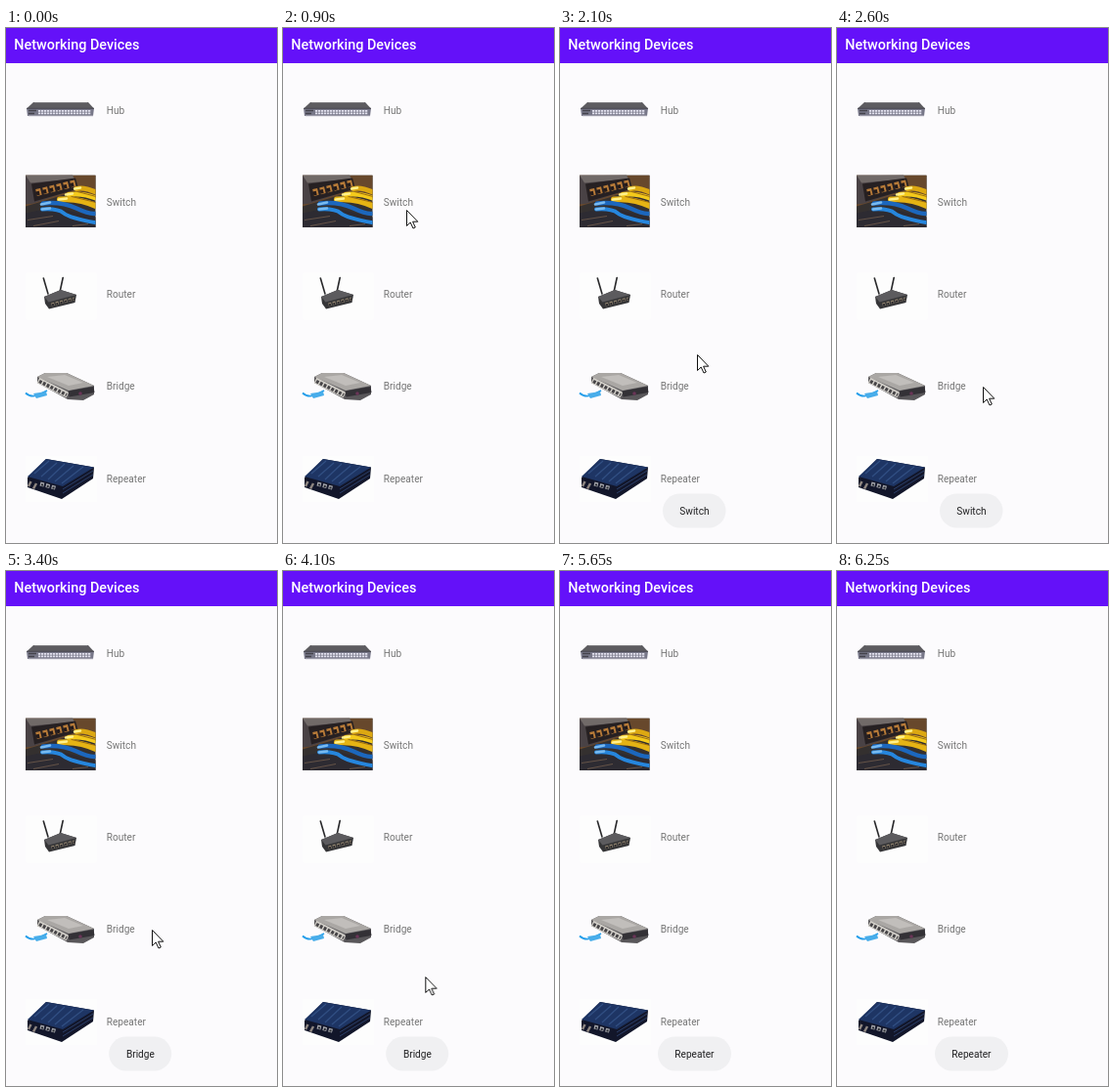
These frames come from a looping animation (277x527 px, 6300 ms). An HTML page:

```html
<!DOCTYPE html>
<html lang="en">
<head>
<meta charset="utf-8">
<title>Networking Devices</title>
<style>
html, body { margin: 0; width: 100%; height: 100%; overflow: hidden; background: #fcfbfd; }
svg { display: block; width: 277px; height: 527px; }
text { font: 10.08px Roboto, sans-serif; fill: #757575; }
.title { font-size: 14.4px; font-weight: 500; fill: #fff; }
.toast { opacity: 0; animation: 6.3s linear infinite; }
.toast rect { fill: #f0f0f2; }
.toast text { fill: #202022; text-anchor: middle; }
#switch { animation-name: switch; }
#bridge { animation-name: bridge; }
#repeater { animation-name: repeater; }
#cursor { animation: move 6.3s ease-in-out infinite; }

@keyframes switch {
  0%, 16.67% { opacity: 0; }
  20.63%, 53.96% { opacity: 1; }
  53.97%, 100% { opacity: 0; }
}
@keyframes bridge {
  0%, 53.96% { opacity: 0; }
  53.97%, 81.75% { opacity: 1; }
  84.13%, 100% { opacity: 0; }
}
@keyframes repeater {
  0%, 85.71% { opacity: 0; }
  88.89%, 100% { opacity: 1; }
}
@keyframes move {
  0%, 5.5% { transform: translate(290px, 235px); }
  11.9%, 24.6% { transform: translate(126px, 186px); }
  33.33%, 34.9% { transform: translate(140px, 334px); }
  41.3%, 53.97% { transform: translate(149px, 367px); }
  75.4%, 81.75% { transform: translate(142px, 457px); }
  88.1%, 100% { transform: translate(290px, 480px); }
}
</style>
</head>
<body>
<svg viewBox="0 0 277 527">
  <rect width="277" height="527" fill="#fcfbfd"/>
  <rect width="277" height="36" fill="#6411f9"/>
  <text class="title" x="8.3" y="22">Networking Devices</text>

  <!-- Hub -->
  <path d="M28 76H84L90 82.5H21Z" fill="#5d5c60"/>
  <path d="M29 76.6H83" stroke="#77767a"/>
  <path d="M21 82H90L89 90H22Z" fill="#777788"/>
  <path d="M21 82.3H90" stroke="#424148" stroke-width=".9"/>
  <path d="M33 84.8H87M33 87.4H87" stroke="#e2e1ee" stroke-width="1.8" stroke-dasharray="2.3 .7"/>
  <path d="M23 84.5H31M23 87.5H29" stroke="#44434c" stroke-width="1.5"/>
  <path d="M23 90H89" stroke="#c9c8d2" stroke-width=".8"/>
  <text x="102.8" y="87.5">Hub</text>

  <!-- Switch -->
  <svg x="20" y="150.5" width="71.5" height="53.5" viewBox="0 0 71.5 53.5">
    <rect width="72" height="54" fill="#34302f"/>
    <path d="M0 0H72V24L50 17L0 32Z" fill="#67482c"/>
    <path d="M0 1L48 0L54 13L8 29L0 30Z" fill="#494245"/>
    <path d="M0 0H48L50 4L5 8Z" fill="#716a68"/>
    <path d="M6 9L51 3L54 14L9 27Z" fill="#262022"/>
    <path d="M11 18L52 8" stroke="#b67a38" stroke-width="7" stroke-dasharray="5 2.2"/>
    <path d="M11 19L52 9" stroke="#241b1a" stroke-width="4" stroke-dasharray="3.3 3.9"/>
    <path d="M0 39L28 33L72 43V54H0Z" fill="#2d2b32"/>
    <g fill="none" stroke-linecap="round">
      <path d="M52 14Q60 12 73 18" stroke="#dca812" stroke-width="5"/>
      <path d="M44 20Q58 18 73 24" stroke="#f4ca1b" stroke-width="5"/>
      <path d="M35 25Q54 23 73 32" stroke="#e5b314" stroke-width="6"/>
      <path d="M50 14L56 13M41 20L48 19M34 25L42 24" stroke="#fff08b" stroke-width="2.5"/>
      <path d="M47 22L72 28M53 17L72 22" stroke="#9e6d10" stroke-width="1"/>
      <path d="M18 29Q37 27 52 34T73 39" stroke="#1c67bd" stroke-width="4.5"/>
      <path d="M17 35Q33 34 39 39T73 49" stroke="#2686dd" stroke-width="4"/>
      <path d="M16 30L25 28M17 35L25 34" stroke="#78baf0" stroke-width="2.6"/>
    </g>
    <path d="M2 46L28 42M8 52L34 47M48 52L64 50" stroke="#655347"/>
  </svg>
  <text x="102.8" y="181.7">Switch</text>

  <!-- Router -->
  <rect x="20" y="250" width="73" height="49" rx="3" fill="#fdfdfd"/>
  <path d="M38.3 256L43 272M58.2 255.5L55.3 269" stroke="#29292b" stroke-width="1.6" stroke-linecap="round"/>
  <path d="M39 275L56 268L72 273L70.5 281L44 287.5L40 282Z" fill="#363638"/>
  <path d="M39 275L56 268L72 273L43.5 280.5Z" fill="#5c5b5e"/>
  <path d="M46.5 283L70 277" stroke="#91846f" stroke-width="3.2" stroke-dasharray="3 1.5"/>
  <path d="M47 283.4L70 277.4" stroke="#222127" stroke-width="1.8" stroke-dasharray="2 2.5"/>
  <text x="102.8" y="276">Router</text>

  <!-- Bridge -->
  <path d="M32 357L40 353L62 353L90 366V375L79 381L63 380L32 363Z" fill="#59575a"/>
  <path d="M32 357L40 353L62 353L90 366L64 371Z" fill="#aaa7a4"/>
  <path d="M42 357L60 355L79 363L64 366Z" fill="#c1bebb"/>
  <path d="M33 360.5L63 375.5" stroke="#d1cec8" stroke-width="6"/>
  <path d="M34 361.5L62 375.5" stroke="#454346" stroke-width="3.5" stroke-dasharray="2.8 1.5"/>
  <path d="M64 374.5L90 370" stroke="#333136" stroke-width="6"/>
  <circle cx="76" cy="374" r="1.8" fill="#6a3557"/>
  <path d="M20 373.5Q26 379 34 375L42 371" fill="none" stroke="#259eea" stroke-width="1.8"/>
  <path d="M28 374L41 372L42 376L31 379Z" fill="#48adea"/>
  <text x="102.8" y="370.3">Bridge</text>

  <!-- Repeater -->
  <rect x="20" y="438" width="73" height="47" fill="#fdfdfd"/>
  <path d="M22 460L41 441L90 449.5L89 461L57 482L22 470Z" fill="#12162a"/>
  <path d="M22 459L41 441L90 449.5L58 469Z" fill="#1e3564"/>
  <path d="M29 456L44 443M36 459L52 445M43 462L60 446M50 464L69 448M57 466L79 449" stroke="#314f83" stroke-width="1.2"/>
  <path d="M58 472L89 453M58 476L89 457" stroke="#2b3e67"/>
  <path d="M35 466.5L52 471" stroke="#a6a7ad" stroke-width="4" stroke-dasharray="4 2"/>
  <path d="M36 467.2L52 471.5" stroke="#292c34" stroke-width="2" stroke-dasharray="2 4"/>
  <path d="M25.5 464L23 469M31 466L28 471.5" stroke="#8d8580" stroke-width="2.5"/>
  <text x="102.8" y="464.7">Repeater</text>

  <g class="toast" id="switch">
    <rect x="105" y="476.5" width="64.5" height="35" rx="17.5"/>
    <text x="137.4" y="497.8">Switch</text>
  </g>
  <g class="toast" id="bridge">
    <rect x="105.2" y="476.5" width="64" height="35" rx="17.5"/>
    <text x="137.4" y="497.8">Bridge</text>
  </g>
  <g class="toast" id="repeater">
    <rect x="100" y="476.5" width="75" height="35" rx="17.5"/>
    <text x="137.4" y="497.8">Repeater</text>
  </g>

  <g id="cursor">
    <path d="M.5 .5V16.5L4.2 13L7 19L9.3 18L6.6 12.2H11.8Z" fill="#fff" stroke="#111"/>
  </g>
</svg>
</body>
</html>
```
